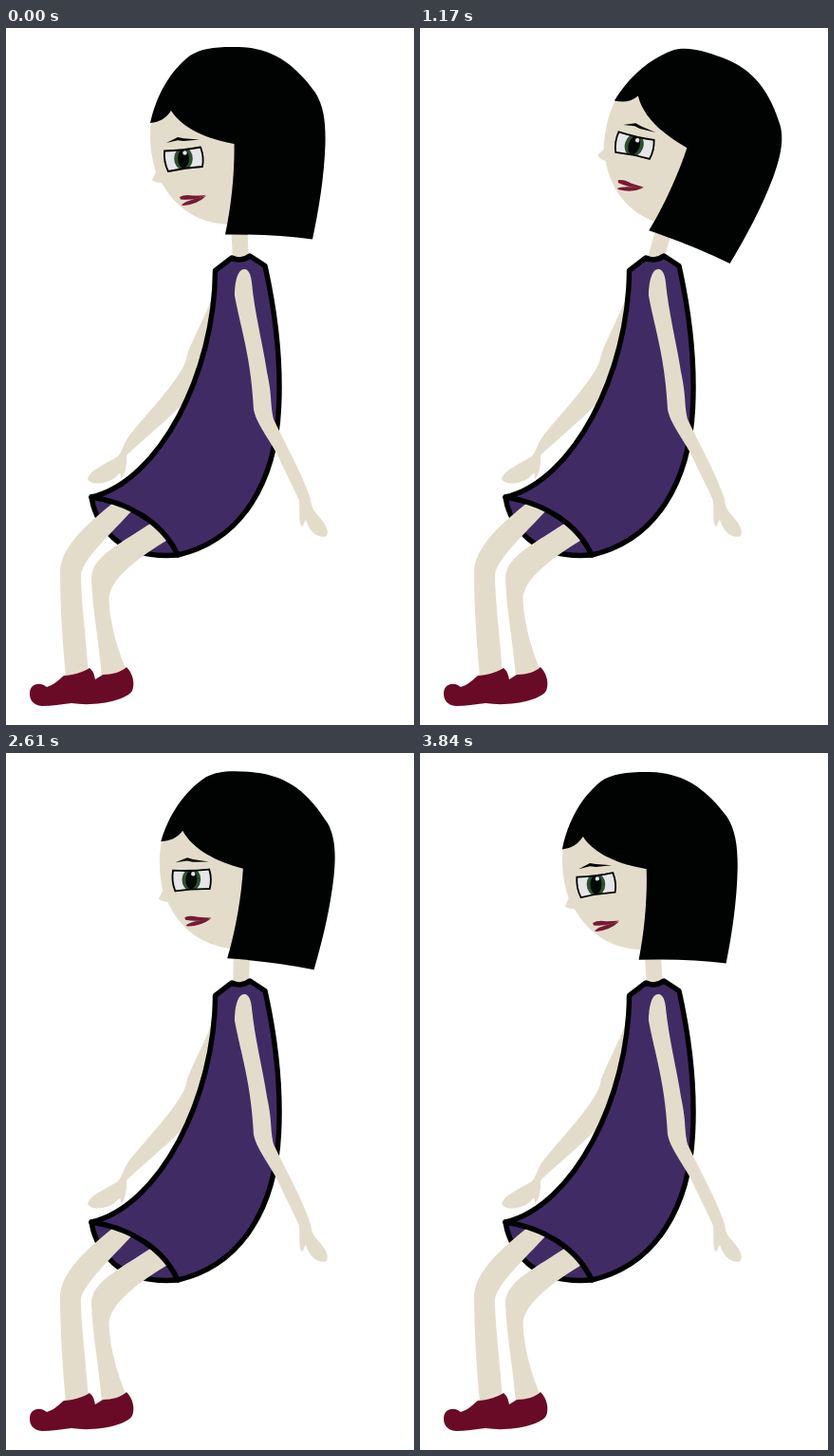
Write an HTML page that moves like this. It is 430 by 734 pixels and loops after 3.87 s.

```html
<!DOCTYPE html>
<html lang="en">
<head>
<meta charset="utf-8">
<title>Seated girl</title>
<style>
  html, body { margin: 0; width: 100%; height: 100%; overflow: hidden; background: #fff; }
  svg { display: block; width: 430px; height: 734px; }
  .skin { fill: #e4dccb; }
  .hair { fill: #010302; }
  .dress { fill: #412b65; stroke: #000; stroke-width: 5.4; stroke-linejoin: round; }
  .shoe { fill: #690a26; }
  .lips { fill: #761a36; }
</style>
</head>
<body>
<svg viewBox="0 0 430 734">
  <defs>
    <path id="eye" d="M167 129.5Q187 129 205 125.500Q209 136 207 146Q189 147 171 151Q166 141 167 129.5Z"/>
    <clipPath id="eyeClip"><use href="#eye"/></clipPath>
  </defs>

  <!-- far arm, inner skirt, legs, shoes -->
  <path class="skin" d="M219 280C205 315 191 338 190 349C183 372 140 415 128 432C123 440 122 447 118 451C105 459 88 466 86 475C90 482 105 480 113 475C119 471 121 464 121 475Q128 468 127 450C150 428 172 412 195 386L222 300Z"/>
  <path class="dress" d="M90 494C95 524 118 560 181 555C166 522 131 500 90 494Z"/>
  <path class="skin" d="M114 499C95 515 58 543 57 572C57 610 60 650 63 684L87 680C84 640 79 600 79 576C80 560 113 530 134 507Z"/>
  <path class="skin" d="M152 522C115 546 90 558 90 580C91 612 98 646 101 684L127 677C118 655 110 630 108.500 602C108 580 142 556 172 538Z"/>
  <path class="shoe" d="M25 701C25 690 36 688 43 694C50 692 55 687 61 682C70 682 82 678 88 674C92 677 93 681 94 686L102 681C112 681 122 678 127 673C134 680 136 690 133 698C127 708 95 715 69 711C58 712 48 714 38 714C28 713 25 707 25 701Z"/>

  <g id="head">
    <path class="skin" d="M237 205H254L256 245H239Z"/>
    <path class="skin" d="M154 92C150 112 152 132 158 152L154 160Q157 163 164 163C178 188 201 206 236 207L250 120L180 80Z"/>
    <path class="hair" d="M152 100C158 72 172 46 194 29C206 21 222 19.500 245 20C281 21 304 38 326 68C335 82 337 100 336.500 122C335.500 155 330 190 323 222.500Q280 217 231 217.500C238 185 241 150 240.500 122C212 117 186 106 174 87C169 95 162 99 152 100Z"/>
    <path class="hair" d="M169 121L181 115L187 116.200L204 117.500L187 119L181 118.200Z"/>
    <use href="#eye" fill="#e5e6e6"/>
    <g clip-path="url(#eyeClip)">
      <ellipse cx="187" cy="137.500" rx="9.800" ry="12" fill="#2f4f35"/>
      <ellipse cx="187" cy="137.500" rx="6" ry="10" fill="#020a05"/>
      <circle cx="188.500" cy="131.500" r="2.200" fill="#e5e6e6"/>
    </g>
    <use href="#eye" fill="none" stroke="#000" stroke-width="1.800"/>
    <path class="lips" d="M183 178Q188 175 197 176.500Q204 176.500 211 176Q200 182 184 180.500Z"/>
    <path class="lips" d="M185 186.500Q189 181.500 211 177Q201 186 187 187Z"/>
  </g>

  <path class="dress" d="M220.500 255.500L238 242Q248 247 257 240L273 250.500C284 300 290 350 287.500 400C284 475 251 539 181 555C166 522 131 500 90 494C162 477 220 363 220.500 255.500Z"/>
  <path class="skin" d="M251 254C244 254 241 268 241 282C247 315 258 345 261 402C265 420 280 435 290 458C298 475 306 490 309 498C310 510 308 522 312 525C314 524 314 520 316 518C320 530 327 537 337 535.500C343 529 333 518 326 510C321 504 322 498 320 493C310 465 295 440 282 412C278 395 281 390 275 362C270 330 262 300 259 268C258 258 255 254 251 254Z"/>
</svg>
<script>
  const LOOP = 3870, STEP = 30;
  const PIVOT = "248.5 246";
  // [time in ms, head tilt in degrees]
  const KEYS = [[0, 0], [480, -5.1], [540, -1.8], [930, 18.6], [2200, 20.8], [2590, 4.4], [LOOP, -0.95]];
  const head = document.getElementById("head");

  function tilt(t) {
    const i = KEYS.findIndex(k => k[0] > t);
    const [t0, a0] = KEYS[i - 1], [t1, a1] = KEYS[i];
    return a0 + (a1 - a0) * (t - t0) / (t1 - t0);
  }

  const start = performance.now();
  function draw(now) {
    const t = Math.max(0, now - start) % LOOP;
    const a = tilt(Math.floor(t / STEP) * STEP);
    head.setAttribute("transform", `rotate(${a.toFixed(3)} ${PIVOT})`);
    requestAnimationFrame(draw);
  }
  draw(start);
</script>
</body>
</html>
```
